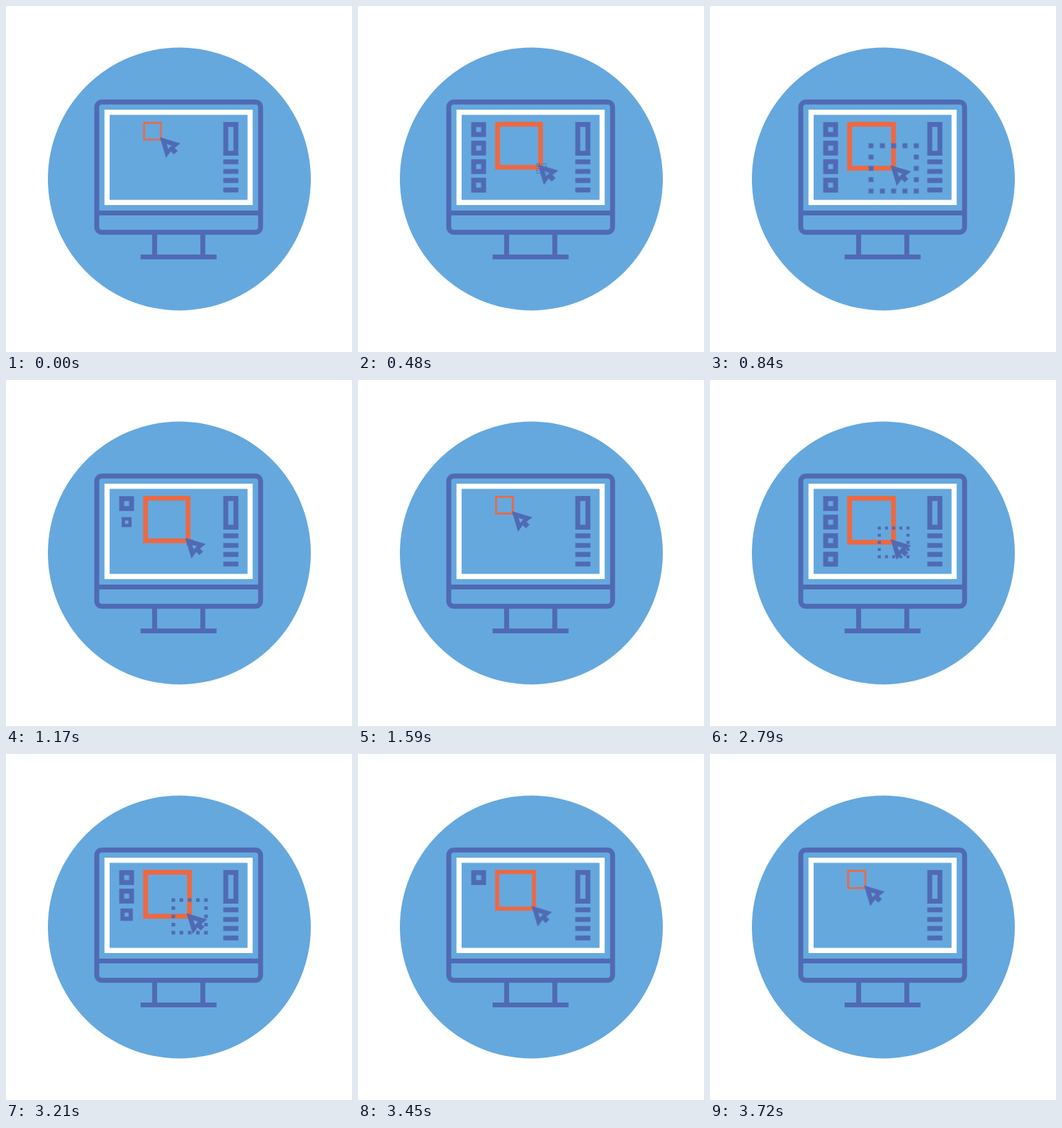
An HTML page for the animation above (3.93 s loop, 504x504 px).

```html
<!DOCTYPE html>
<html lang="en">
<head>
<meta charset="utf-8">
<title>Drawing on a monitor</title>
<style>
  html, body { margin: 0; width: 100%; height: 100%; overflow: hidden; background: #fff; }
  svg { display: block; width: 100vw; height: 100vh; }
  .line { fill: none; stroke: #506ab4; stroke-width: 7.2; }
  .solid { fill: #506ab4; }
</style>
</head>
<body>
<svg viewBox="0 0 504 504">
  <circle cx="252.5" cy="252" r="191.5" fill="#65a8de"/>

  <!-- monitor -->
  <g class="line">
    <rect x="132.2" y="139.8" width="238.6" height="189.8" rx="7.5"/>
    <path d="M132 301.5H371M216.5 330V365.5M286.7 330V365.5M196 365.5H306.7"/>
  </g>
  <rect x="147.2" y="154.8" width="208.4" height="131.4" fill="none" stroke="#fff" stroke-width="7.5"/>

  <!-- side panel -->
  <g class="line">
    <rect x="320.1" y="172.6" width="14.8" height="41.8"/>
    <path d="M316.5 227H338.5M316.5 241H338.5M316.5 254.2H338.5M316.5 268H338.5"/>
  </g>

  <g id="tools"></g>

  <g transform="translate(199.8 168.8)">
    <rect id="art" x="3.5" y="3.5" width="64" height="64" fill="none" stroke="#ee6842" stroke-width="7"/>
  </g>
  <g transform="translate(267.5 236.5)">
    <path id="handle" class="line" d="M0-33H33V33H-33V-33Z" stroke-dasharray="7.2 9.3" stroke-dashoffset="3.6"/>
  </g>
  <path id="cursor" class="solid" fill-rule="evenodd"
    d="M0 0L30 9L21.5 15.5L26 20L20.5 25L16 20.5L9 30ZM10 10L17 12.2L12.2 17Z"/>
</svg>

<script>
  const LOOP = 3930;
  const STARTS = [0, 2190];
  const SMOOTH = 'cubic-bezier(.33, 0, .67, 1)';
  const SINE_OUT = 'cubic-bezier(.39, .575, .565, 1)';
  const SINE_IN = 'cubic-bezier(.47, 0, .745, .715)';

  // Each pose is [ms within a pass, transform, easing towards the next pose].
  function play(el, poses) {
    const frames = STARTS.flatMap(start => poses.map(([ms, transform, easing = 'linear']) =>
      ({ offset: (start + ms) / LOOP, transform, easing })));
    const rest = poses[0][1];
    if (frames[0].offset > 0) frames.unshift({ offset: 0, transform: rest });
    frames.push({ offset: 1, transform: rest });
    el.animate(frames, { duration: LOOP, iterations: Infinity });
  }

  const byId = id => document.getElementById(id);

  function drag(el, from, to) {
    play(el, [[0, from, SMOOTH], [540, to], [1110, to, SMOOTH], [1560, from]]);
  }
  drag(byId('art'), 'scale(.383)', 'scale(1)');
  drag(byId('cursor'), 'translate(224px, 191px)', 'translate(263px, 232px)');

  play(byId('handle'), [
    [425, 'scale(0)', SINE_OUT],
    [845, 'scale(1)', SINE_IN],
    [1205, 'scale(0)']
  ]);

  // Tool buttons pop in from the top and leave from the bottom.
  const NS = 'http://www.w3.org/2000/svg';
  function make(parent, tag, attrs) {
    const el = document.createElementNS(NS, tag);
    for (const name in attrs) el.setAttribute(name, attrs[name]);
    return parent.appendChild(el);
  }
  for (let i = 0; i < 4; i++) {
    const spot = make(byId('tools'), 'g', { transform: `translate(175.7 ${180 + 27 * i})` });
    const tool = make(spot, 'rect', { class: 'line', x: -7.2, y: -7.2, width: 14.4, height: 14.4 });
    const enter = 120 * i;
    const leave = 1260 - 135 * i;
    play(tool, [
      [enter, 'scale(0)', SMOOTH],
      [enter + 120, 'scale(1)'],
      [leave, 'scale(1)', SMOOTH],
      [leave + 120, 'scale(0)']
    ]);
  }
</script>
</body>
</html>
```
